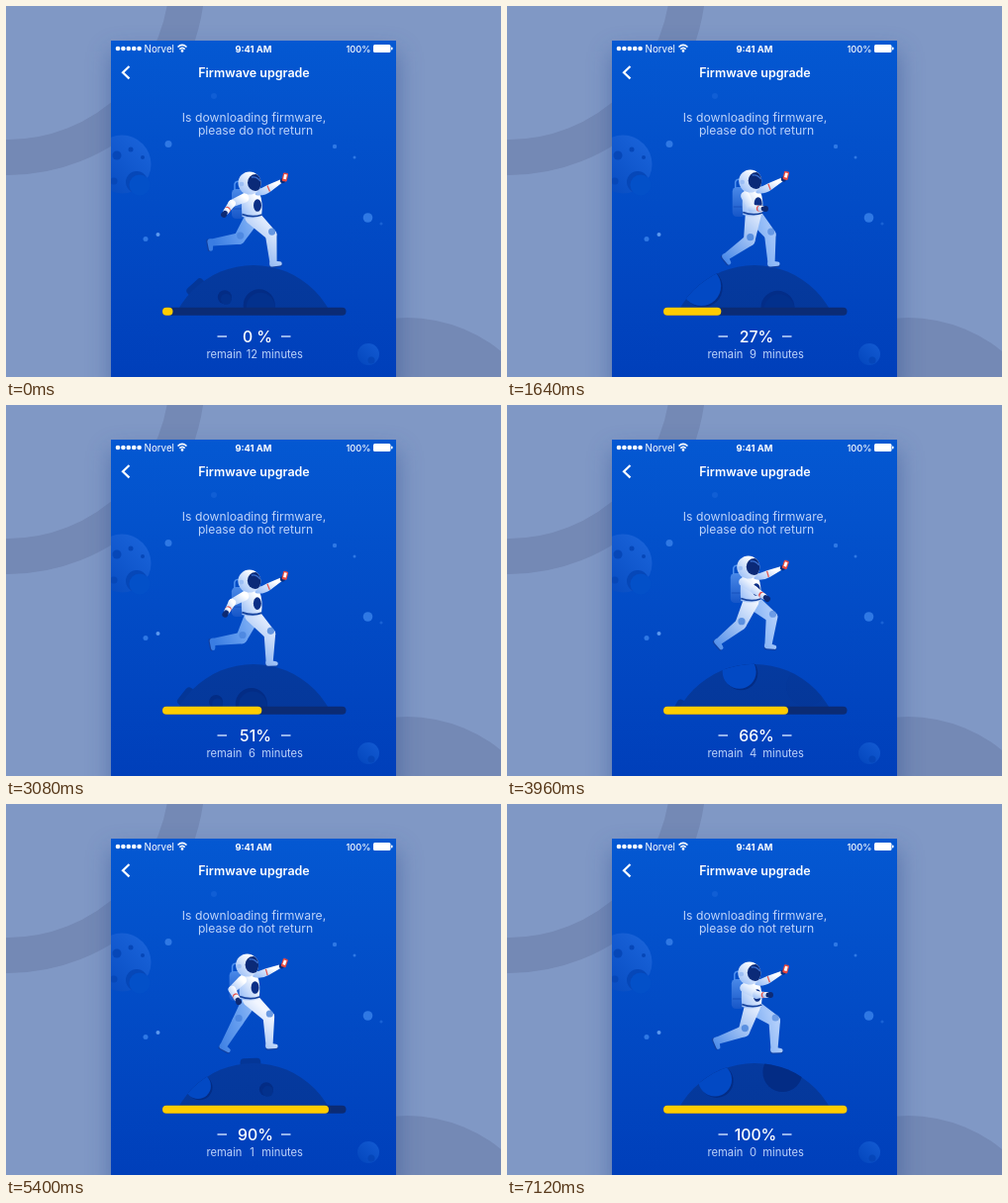
An HTML page that plays this animation: 500 px wide and 375 px high, repeating every 7.16 s.

```html
<!DOCTYPE html>
<html lang="en">
<head>
<meta charset="utf-8">
<title>Firmware upgrade</title>
<style>
html, body { margin: 0; width: 100%; height: 100%; overflow: hidden; background: #8098c5; }
svg { display: block; width: 100vw; height: 100vh; }
text { font-family: Inter, "Open Sans", sans-serif; fill: #fff; }
.soft { fill: #bdd3fa; }
.mid { text-anchor: middle; }
</style>
</head>
<body>
<svg viewBox="0 0 500 375" xmlns="http://www.w3.org/2000/svg">
  <defs>
    <linearGradient id="sky" x2="0" y2="1"><stop stop-color="#0458d2"/><stop offset="1" stop-color="#003fba"/></linearGradient>
    <linearGradient id="planet" x1="1" y1="0" x2="0" y2="1"><stop stop-color="#1c66dc"/><stop offset="1" stop-color="#0448bd"/></linearGradient>
    <linearGradient id="moonFill" x2="0" y2=".5"><stop stop-color="#053a9f"/><stop offset="1" stop-color="#043697"/></linearGradient>
    <linearGradient id="suit" x1="1" y1="0" x2="0" y2="1"><stop offset=".25" stop-color="#fff"/><stop offset="1" stop-color="#8cb5f6"/></linearGradient>
    <linearGradient id="pack" x2="0" y2="1"><stop stop-color="#4a89e8"/><stop offset="1" stop-color="#1656c8"/></linearGradient>
    <linearGradient id="nearLeg" gradientUnits="userSpaceOnUse" x1="258" y1="205" x2="212" y2="252"><stop stop-color="#f2f6ff"/><stop offset="1" stop-color="#4486e8"/></linearGradient>
    <linearGradient id="farLeg" gradientUnits="userSpaceOnUse" x1="275" y1="225" x2="212" y2="245"><stop stop-color="#b4d0fb"/><stop offset=".5" stop-color="#6ba2f1"/><stop offset="1" stop-color="#3a7de2"/></linearGradient>
    <filter id="blur" x="-20%" y="-20%" width="140%" height="140%"><feGaussianBlur stdDeviation="12"/></filter>
    <clipPath id="screenClip"><rect x="106" y="35" width="288" height="340"/></clipPath>
    <clipPath id="ground"><rect x="150" y="240" width="200" height="65"/></clipPath>
    <clipPath id="moonClip"><circle cx="250" cy="349" r="87.300"/></clipPath>
    <clipPath id="helmet"><circle cx="246" cy="12" r="11.500"/></clipPath>
  </defs>

  <rect width="500" height="375" fill="#8098c5"/>
  <circle cx="2" cy="-28" r="181" fill="none" stroke="#7489b5" stroke-width="36"/>
  <circle cx="405" cy="465" r="150" fill="#7489b5"/>
  <rect x="106" y="46" width="290" height="350" fill="#2f4f93" opacity=".5" filter="url(#blur)"/>
  <rect x="106" y="35" width="288" height="340" fill="url(#sky)"/>

  <g clip-path="url(#screenClip)">
    <circle cx="117" cy="160" r="29.500" fill="url(#planet)"/>
    <g fill="#0647b8">
      <circle cx="132" cy="178" r="11"/><circle cx="112" cy="151" r="4.500"/>
      <circle cx="126" cy="145" r="2.500"/><circle cx="109" cy="177" r="3.500"/><circle cx="138" cy="153" r="2"/>
    </g>
    <circle cx="135" cy="181" r="10.500" fill="#0350c8"/>
    <g fill="#2f78e4">
      <circle cx="164" cy="139.500" r="3.500"/><circle cx="332" cy="142" r="2.200"/><circle cx="352" cy="153" r="1.500"/>
      <circle cx="365.500" cy="214" r="4.800"/><circle cx="379" cy="220" r="1.600" opacity=".5"/>
      <circle cx="141" cy="235.500" r="2.500"/><circle cx="153.500" cy="231" r="2" fill="#5c98ee"/>
      <circle cx="210" cy="91" r="3" opacity=".3"/>
    </g>
    <circle cx="366" cy="352" r="11" fill="url(#planet)" opacity=".7"/>
    <circle cx="369" cy="358" r="3.500" fill="#0342b4" opacity=".7"/>
  </g>

  <g id="statusDots" fill="#fff"></g>
  <text x="139.500" y="46.500" font-size="9.800">Norvel</text>
  <g fill="none" stroke="#fff" stroke-width="1.600">
    <path d="M173.500 41.500Q178 37.300 182.500 41.500M175.300 43.600Q178 41 180.700 43.600"/>
    <circle cx="178" cy="45.400" r=".6"/>
  </g>
  <text class="mid" x="250" y="46.500" font-size="9.400" font-weight="700">9:41 AM</text>
  <text x="368.500" y="46.500" font-size="9.300" font-weight="500" text-anchor="end">100%</text>
  <rect x="371" y="39" width="17.500" height="8" rx="1.500" fill="#fff"/>
  <rect x="389" y="41.500" width="1.500" height="3" rx=".7" fill="#fff"/>
  <path d="M124.500 61L118 67.200L124.500 73.400" fill="none" stroke="#fff" stroke-width="2.200"/>
  <text class="mid" x="250.500" y="72" font-size="12.500" font-weight="600">Firmwave upgrade</text>
  <g class="mid" font-size="12.200">
    <text class="soft" x="250.500" y="117">Is downloading firmware,</text>
    <text class="soft" x="252" y="130">please do not return</text>
  </g>

  <g clip-path="url(#ground)">
    <g id="bumps" fill="#043697"></g>
    <circle cx="250" cy="349" r="87" fill="url(#moonFill)"/>
    <g id="craters" clip-path="url(#moonClip)"></g>
  </g>

  <g id="farLegParts" fill="url(#farLeg)"></g>
  <g class="upper">
    <rect x="228" y="18" width="13" height="30" rx="4.500" fill="url(#pack)"/>
    <path d="M231 19V13Q232 9 237 11" fill="none" stroke="#4f90ee" stroke-width="1.500"/>
    <path d="M229 38H240" stroke="#1650bd"/>
  </g>
  <g id="nearLegParts" fill="url(#nearLeg)"></g>
  <g class="upper">
    <path d="M240 21Q249 18 256 22Q260 31 258 46Q249 49 238.500 46Q237 30 240 21Z" fill="url(#suit)"/>
    <ellipse cx="254" cy="34.500" rx="4" ry="6.300" fill="#0b2f86"/>
    <path d="M238.500 43.500Q249 47.500 258.500 44" fill="none" stroke="#17449f" stroke-width="1.800"/>
    <g id="phoneArm">
      <path d="M252 24Q260 26 268 20L279 11.500L277 8.500L264 14Q258 18 251 19Z" fill="url(#suit)"/>
      <path d="M264 14.500L266.500 20.500" stroke="#e2534f" stroke-width="1.200"/>
      <circle cx="279.500" cy="9.500" r="2.600" fill="#0d2d7c"/>
      <g transform="rotate(12 282 6)">
        <rect x="279.300" y="1.700" width="5.200" height="8.600" rx="1.200" fill="#e8493f"/>
        <rect x="280.500" y="3.200" width="2.800" height="4.800" fill="#fff"/>
      </g>
    </g>
    <circle cx="246" cy="12" r="11.500" fill="url(#suit)"/>
    <g clip-path="url(#helmet)">
      <ellipse cx="252" cy="11.500" rx="8" ry="8.500" fill="#0b2a78"/>
      <path d="M248 6Q253 5 257 10" fill="none" stroke="#3a6fd0" stroke-width="1.300"/>
    </g>
    <circle cx="238" cy="13" r="2.300" fill="#9dbff5"/>
  </g>
  <g id="armParts" fill="url(#suit)"></g>

  <rect x="158" y="304.800" width="185.500" height="8" rx="4" fill="#0b2b74"/>
  <rect id="fill" x="158" y="304.800" width="10" height="8" rx="4" fill="#fc0"/>
  <path d="M213.500 334H223M278 334H287.500" stroke="#c6d9fb" stroke-width="1.300"/>
  <text id="percent" class="mid" font-size="15.800" font-weight="500" y="339.500"></text>
  <g font-size="11.200">
    <text class="soft" x="202.500" y="356">remain</text>
    <text id="minutes" class="soft mid" x="248.500" y="356"></text>
    <text class="soft" x="300" y="356" text-anchor="end">minutes</text>
  </g>
</svg>
<script>
const LOOP = 7160, STRIDE = 3000, STEP = 40;
const $ = id => document.getElementById(id);
const clamp01 = v => Math.max(0, Math.min(1, v));
const circle = (x, y, r, attrs = '') => `<circle cx="${x.toFixed(2)}" cy="${y.toFixed(2)}" r="${r}" ${attrs}/>`;

// time, helmet top, near ankle x y, far ankle x y, swinging hand x y
const poses = [
  [0, 167, 270, 259, 208, 239, 220, 211],
  [480, 155, 238, 255, 231, 242, 236, 211],
  [720, 150, 226, 247, 253, 240, 252, 203],
  [960, 152, 214, 239, 264, 242, 263, 196],
  [1120, 159, 213, 239, 270, 247, 266, 193],
  [1640, 165, 222, 253, 267, 259, 261, 205],
  [2020, 155, 232, 243, 239, 254, 249, 204],
  [2250, 150, 258, 241, 227, 248, 240, 201],
  [2400, 151, 266, 243, 220, 244, 235, 200],
  [2650, 159, 270, 249, 212, 239, 226, 203]
];
const spin = [[0, 0], [480, 58], [960, 140], [1120, 159], [1640, 218], [2400, 320], [3000, 360]];

// kind, angle, distance from the centre, radius
const features = [
  ['bump', -42, 83, 9], ['crater', -28, 62, 7], ['crater', 7, 47, 16],
  ['bump', 79, 84, 8], ['crater', 67, 62, 12.5],
  ['notch', 130, 79, 17], ['notch', 179, 83, 20],
  ['crater', 246, 50, 17], ['notch', 279, 83, 13]
];

function poseAt(time) {
  const n = poses.length;
  let i = n - 1;
  while (poses[i][0] > time) i--;
  const row = k => poses[(k + n) % n];
  const at = k => row(k)[0] + Math.floor(k / n) * STRIDE;
  const span = at(i + 1) - at(i), u = (time - at(i)) / span;
  return poses[0].map((_, c) => {
    const a = row(i)[c], b = row(i + 1)[c];
    const slopeA = (b - row(i - 1)[c]) / (at(i + 1) - at(i - 1)) * span;
    const slopeB = (row(i + 2)[c] - a) / (at(i + 2) - at(i)) * span;
    return a + u * (slopeA + u * (3 * (b - a) - 2 * slopeA - slopeB + u * (2 * (a - b) + slopeA + slopeB)));
  }).slice(1);
}

function spinAt(time) {
  const i = spin.findIndex(k => k[0] > time);
  const [t0, a] = spin[i - 1], [t1, b] = spin[i];
  return a + (b - a) * (time - t0) / (t1 - t0);
}

// Middle joint of a two-bone limb
function joint([x, y], [ex, ey], upper, lower, side) {
  const dx = ex - x, dy = ey - y, d = Math.hypot(dx, dy);
  const along = Math.min(upper, (upper * upper - lower * lower + d * d) / (2 * d));
  const out = side * Math.sqrt(Math.max(0, upper * upper - along * along));
  return [x + (dx * along + dy * out) / d, y + (dy * along - dx * out) / d];
}

function bone([x, y], [ex, ey], r, er, attrs = '') {
  const d = Math.hypot(ex - x, ey - y) || 1, nx = (ey - y) / d, ny = (x - ex) / d;
  const point = (px, py, k) => `${(px + nx * k).toFixed(2)} ${(py + ny * k).toFixed(2)}`;
  return `<path d="M${point(x, y, r)}A${r} ${r} 0 0 0 ${point(x, y, -r)}L${point(ex, ey, -er)}A${er} ${er} 0 0 0 ${point(ex, ey, er)}Z" ${attrs}/>`;
}

function leg(hip, ankle, patch) {
  const knee = joint(hip, ankle, 26, 28, 1);
  const dx = ankle[0] - knee[0], dy = ankle[1] - knee[1], d = Math.hypot(dx, dy);
  const move = (down, fore) => [ankle[0] + (dx * down + dy * fore) / d, ankle[1] + (dy * down - dx * fore) / d];
  return bone(move(3.6, -2), move(3.6, 7), 2, 1.6, 'fill="#123f9e"')
    + bone(hip, knee, 8, 5.8) + bone(knee, ankle, 5.8, 3.6)
    + bone(move(1.5, -1), move(2, 6.5), 3, 2.1)
    + circle(knee[0] + 1, knee[1] - 3, 3.6, `fill="#3f7cd8" opacity="${patch}"`);
}

function arm(shoulder, hand) {
  const elbow = joint(shoulder, hand, 14, 14, -1);
  const toward = k => [0, 1].map(i => elbow[i] + (hand[i] - elbow[i]) * k);
  return bone(shoulder, elbow, 4.6, 3.8) + bone(elbow, toward(.75), 3.8, 2.8)
    + bone(toward(.55), toward(.6), 3, 3, 'fill="#e2534f"')
    + bone(toward(.65), toward(.75), 3, 2.8) + bone(toward(.85), hand, 2.5, 3, 'fill="#0d2a74"');
}

function drawMoon(time) {
  const turn = spinAt(time);
  let bumps = '', craters = '';
  for (const [kind, angle, dist, r] of features) {
    const a = ((angle - turn) % 360 + 540) % 360 - 180;
    if (Math.abs(a) > 85) continue;
    const x = 250 + dist * Math.sin(a * Math.PI / 180), y = 349 - dist * Math.cos(a * Math.PI / 180);
    if (kind === 'bump') {
      const w = r * 1.15;
      bumps += `<rect x="${x - w}" y="${y - r}" width="${2 * w}" height="${2 * r}" rx="4" transform="rotate(${a} ${x} ${y})"/>`;
      continue;
    }
    // Craters emerge from the shaded right limb
    const shade = clamp01((40 - a) / 14);
    craters += circle(x, y, r, `fill="#032c85" opacity="${shade}"`);
    if (kind === 'notch') {
      craters += circle(x - 1.6, y - 1.4, r, `fill="#0249c4" opacity="${clamp01((10 - a) / 16)}"`);
    } else {
      craters += circle(x + 1.5, y + 2, r - 1.5, `fill="#03318d" opacity="${shade}"`);
    }
  }
  $('bumps').innerHTML = bumps;
  $('craters').innerHTML = craters;
}

function drawRunner(time) {
  const [top, nx, ny, fx, fy, hx, hy] = poseAt(time);
  const lean = (top - 167) * .15;
  document.querySelectorAll('.upper').forEach(g => g.setAttribute('transform', `translate(${lean} ${top})`));
  $('phoneArm').setAttribute('transform', `rotate(${(167 - top) * .45} 254 22)`);
  const hip = [249 + lean, top + 46];
  $('nearLegParts').innerHTML = leg(hip, [nx, ny], .75);
  $('farLegParts').innerHTML = leg([hip[0] + .5, hip[1]], [fx, fy], .6);
  $('armParts').innerHTML = arm([241 + lean, top + 27], [hx, hy]);
}

function drawProgress(time) {
  const done = Math.min(1, time / 6000), percent = Math.floor(done * 100 + 1e-6);
  $('fill').setAttribute('width', 10.5 + 175 * done);
  $('percent').textContent = percent < 10 ? `${percent} %` : `${percent}%`;
  $('percent').setAttribute('x', percent < 10 ? 254 : percent < 100 ? 252 : 251);
  $('minutes').textContent = Math.round(12 * (1 - done));
}

function render(now) {
  const time = Math.floor((now % LOOP) / STEP) * STEP;
  drawMoon(time % STRIDE);
  drawRunner(time % STRIDE);
  drawProgress(time);
}

$('statusDots').innerHTML = [0, 1, 2, 3, 4].map(i => circle(113 + i * 5.4, 43, 2.3)).join('');
let start;
function tick(now) {
  start ??= now;
  render(now - start);
  requestAnimationFrame(tick);
}
render(0);
requestAnimationFrame(tick);
</script>
</body>
</html>
```
